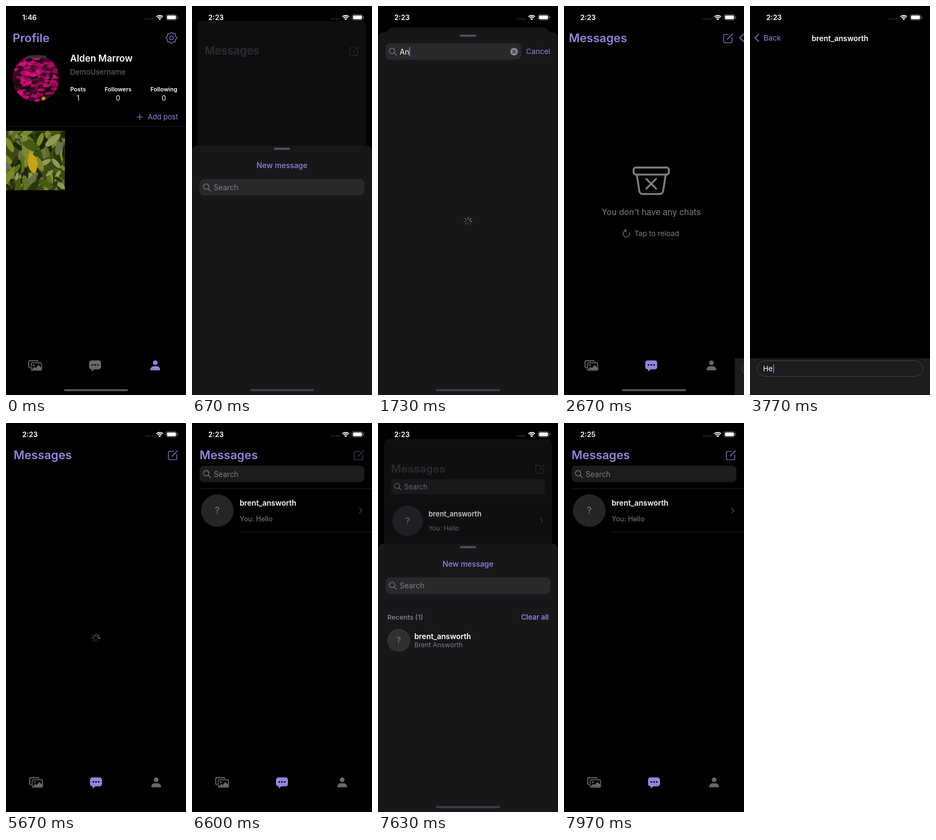
Recreate the animation shown at these times as an HTML page with a canvas. Size 332 px wide and 720 px high, loop 8000 ms.

```html
<!DOCTYPE html>
<html lang="en">
<head>
<meta charset="utf-8">
<title>Messenger demo</title>
<style>
html, body { margin: 0; width: 100%; height: 100%; overflow: hidden; background: #000; }
canvas { display: block; width: 332px; height: 720px; }
</style>
</head>
<body>
<canvas id="stage"></canvas>
<script>
const W = 332, H = 720, LOOP = 8000, STEP = 1000 / 30;
const USER = 'brent_answorth', FULL_NAME = 'Brent Answorth';
const LILAC = '#9286dc', GREY = '#7f7f83', WHITE = '#fff', DIM = '#69696d';
const SHEET = '#17171a', FIELD = '#1c1c1e', SHEET_FIELD = '#29292c', LINE = '#1e1e20';

const canvas = document.getElementById('stage');
const ctx = canvas.getContext('2d');
const dpr = window.devicePixelRatio || 1;
canvas.width = W * dpr;
canvas.height = H * dpr;

const clamp = v => Math.max(0, Math.min(1, v));
const ease = (t, start, dur) => (1 - Math.cos(Math.PI * clamp((t - start) / dur))) / 2;
const mix = (a, b, p) => a + (b - a) * p;

function text(str, x, y, size, color, weight = 400, align = 'left') {
  ctx.font = `${weight} ${size}px Inter, Roboto, sans-serif`;
  ctx.textAlign = align;
  ctx.textBaseline = 'alphabetic';
  ctx.fillStyle = color;
  ctx.fillText(str, x, y + size * 0.364);
}
function textWidth(str, size) {
  ctx.font = `400 ${size}px Inter, Roboto, sans-serif`;
  return ctx.measureText(str).width;
}
function box(x, y, w, h, r, color) {
  ctx.beginPath();
  ctx.roundRect(x, y, w, h, r);
  ctx.fillStyle = color;
  ctx.fill();
}
function disc(x, y, r, color) {
  ctx.beginPath();
  ctx.arc(x, y, r, 0, Math.PI * 2);
  ctx.fillStyle = color;
  ctx.fill();
}
function ring(x, y, r, color, width, from = 0, to = Math.PI * 2) {
  ctx.beginPath();
  ctx.arc(x, y, r, from, to);
  stroke(color, width);
}
function stroke(color, width) {
  ctx.strokeStyle = color;
  ctx.lineWidth = width;
  ctx.lineCap = ctx.lineJoin = 'round';
  ctx.stroke();
}
// Each path is a flat list of x, y pairs.
function lines(color, width, ...paths) {
  ctx.beginPath();
  for (const p of paths)
    for (let i = 0; i < p.length; i += 2) ctx[i ? 'lineTo' : 'moveTo'](p[i], p[i + 1]);
  stroke(color, width);
}
function shifted(x, y, draw) {
  ctx.save();
  ctx.translate(x, y);
  draw();
  ctx.restore();
}
function seeded(seed) {
  return () => (seed = (seed * 16807) % 2147483647) / 2147483647;
}

function statusBar(t) {
  const clock = t < 120 ? '1:46' : t < 7930 ? '2:23' : '2:25';
  text(clock, 30, 21, 13, WHITE, 600);
  for (let i = 0; i < 4; i++) box(257 + i * 4, 23, 2.4, 2, 1, '#48484b');
  const mid = -Math.PI / 2;
  for (const r of [6.2, 9.4]) {
    ctx.beginPath();
    ctx.arc(283.5, 26, r - 0.8, mid - 0.78, mid + 0.78);
    ctx.strokeStyle = WHITE;
    ctx.lineWidth = 2;
    ctx.lineCap = 'butt';
    ctx.stroke();
  }
  ctx.beginPath();
  ctx.moveTo(283.5, 26.3);
  ctx.arc(283.5, 26.3, 3.4, mid - 0.78, mid + 0.78);
  ctx.fillStyle = WHITE;
  ctx.fill();
  ctx.beginPath();
  ctx.roundRect(295.5, 16, 19.5, 10, 3);
  stroke('#707074', 1);
  box(297, 17.5, 16.5, 7, 1.8, WHITE);
  box(316, 19.2, 1.4, 3.6, 1, '#707074');
}

function tabs(active) {
  const color = i => i === active ? LILAC : DIM;
  ctx.beginPath();
  ctx.roundRect(43.8, 656.5, 17, 13, 2.5);
  stroke(color(0), 1.8);
  box(46.5, 658.5, 22.5, 17.5, 4, '#000');
  ctx.beginPath();
  ctx.roundRect(48.3, 660.4, 19, 13.8, 2.5);
  stroke(color(0), 1.6);
  disc(53, 664.6, 1.7, color(0));
  ctx.beginPath();
  ctx.moveTo(49, 673);
  ctx.lineTo(54, 668);
  ctx.lineTo(56.5, 670);
  ctx.lineTo(61.5, 664.5);
  ctx.lineTo(67, 669.5);
  ctx.lineTo(67, 673.6);
  ctx.closePath();
  ctx.fillStyle = color(0);
  ctx.fill();

  box(155, 656, 22, 16.5, 4.5, color(1));
  ctx.beginPath();
  ctx.moveTo(160, 671);
  ctx.lineTo(160, 676.5);
  ctx.lineTo(166.5, 671);
  ctx.fill();
  for (const x of [161, 166, 171]) disc(x, 664.2, 1.5, '#000');

  disc(277, 660.2, 4.3, color(2));
  box(268, 666.8, 18, 7.4, [8, 8, 1.5, 1.5], color(2));
}

function photo(x, y, w, h, round, base, colors, seed, count, rx, ry) {
  const rnd = seeded(seed);
  ctx.save();
  ctx.beginPath();
  ctx.roundRect(x, y, w, h, round);
  ctx.clip();
  ctx.fillStyle = base;
  ctx.fillRect(x, y, w, h);
  for (let i = 0; i < count; i++) {
    const size = 0.6 + rnd() * 0.7;
    ctx.beginPath();
    ctx.ellipse(x + rnd() * w, y + rnd() * h, rx * size, ry * size, (rnd() - 0.5) * (ry > rx ? 2.4 : 0.5), 0, 7);
    ctx.fillStyle = colors[Math.floor(rnd() * colors.length)];
    ctx.fill();
  }
  ctx.restore();
}

function gear(x, y) {
  ctx.beginPath();
  for (let i = 0; i <= 64; i++) {
    const a = i / 64 * Math.PI * 2;
    const r = 8 + 1.9 * clamp(Math.cos(a * 8) * 1.6 + 0.5);
    ctx.lineTo(x + r * Math.cos(a), y + r * Math.sin(a));
  }
  stroke(LILAC, 1.1);
  ring(x, y, 3.4, LILAC, 1.1);
}

function profile(t) {
  shifted(mix(-1.8, 0, ease(t, 0, 110)), 0, () => {
    text('Profile', 14, 59, 21.7, LILAC, 600);
    gear(307, 59);
    photo(14, 91, 86, 86, 43, '#3a0622', ['#b80a68', '#cf0f7c', '#8c0a4c', '#4d0a2c', '#a80b5f', '#1c0a12'], 41, 230, 6, 3);
    box(42, 91.5, 34, 5, 3, '#343434');
    disc(71, 171, 3.5, '#c28a20');
    text('Alden Marrow', 120, 97, 17, WHITE, 600);
    text('DemoUsername', 120, 122, 13.4, DIM);
    const stats = [['Posts', '1', 134.7], ['Followers', '0', 208.5], ['Following', '0', 293]];
    for (const [label, count, x] of stats) {
      text(label, x, 154.5, 10.7, WHITE, 600, 'center');
      text(count, x, 170, 13, WHITE, 400, 'center');
    }
    lines(LILAC, 1.2, [243.5, 205.5, 253.5, 205.5], [248.5, 200.5, 248.5, 210.5]);
    text('Add post', 319, 205.5, 13.1, LILAC, 400, 'right');
    ctx.fillStyle = LINE;
    ctx.fillRect(0, 222.5, W + 2, 1);
    photo(0, 231, 110.5, 110, 0, '#3d4a12', ['#5f7018', '#2a360c', '#7d8a28', '#465a14', '#1c260a', '#8f9a55', '#6b6f4c'], 97, 120, 5, 13);
    ctx.beginPath();
    ctx.moveTo(45, 270);
    ctx.quadraticCurveTo(69, 283, 55, 311);
    ctx.quadraticCurveTo(36, 302, 45, 270);
    ctx.fillStyle = '#c6a21c';
    ctx.fill();
    tabs(2);
  });
}

function compose(color) {
  ctx.beginPath();
  ctx.moveTo(309, 52.5);
  ctx.lineTo(302, 52.5);
  ctx.quadraticCurveTo(299.5, 52.5, 299.5, 55);
  ctx.lineTo(299.5, 65.5);
  ctx.quadraticCurveTo(299.5, 68, 302, 68);
  ctx.lineTo(312.5, 68);
  ctx.quadraticCurveTo(315, 68, 315, 65.5);
  ctx.lineTo(315, 58);
  stroke(color, 1.2);
  lines(color, 1.3, [306.5, 61.5, 316, 51.5]);
}

function searchField(x, y, w, fill, value = '') {
  box(x, y, w, 30.5, 8, fill);
  ring(x + 12, y + 14, 5, GREY, 1.3);
  lines(GREY, 1.3, [x + 15.8, y + 17.8, x + 20, y + 22]);
  text(value || 'Search', x + 26, y + 15.5, 13.8, value ? WHITE : GREY);
}

function spinner(x, y, t) {
  const step = Math.floor(t / 100);
  for (let i = 0; i < 8; i++) {
    const a = i * Math.PI / 4;
    ctx.globalAlpha = 1 - ((step - i + 800) % 8) * 0.11;
    lines('#88888c', 1.6, [x + 3.8 * Math.cos(a), y + 3.8 * Math.sin(a), x + 7.5 * Math.cos(a), y + 7.5 * Math.sin(a)]);
  }
  ctx.globalAlpha = 1;
}

function emptyState(pressed) {
  ctx.beginPath();
  ctx.roundRect(133.5, 299, 65, 13, 4);
  stroke(GREY, 3.6);
  ctx.beginPath();
  ctx.moveTo(139.5, 313);
  ctx.lineTo(144, 342);
  ctx.quadraticCurveTo(145, 348, 150, 348);
  ctx.lineTo(182, 348);
  ctx.quadraticCurveTo(187, 348, 188, 342);
  ctx.lineTo(192.5, 313);
  stroke(GREY, 3.4);
  lines(GREY, 3.2, [157, 320, 175, 338], [175, 320, 157, 338]);
  text("You don't have any chats", 166, 381, 15.4, GREY, 400, 'center');
  ctx.globalAlpha = pressed ? 0.4 : 1;
  ring(120, 421.5, 6, GREY, 1.2, -0.4, 4.5);
  lines(GREY, 1.2, [117, 413.3, 120, 415.5, 117.5, 418]);
  text('Tap to reload', 135, 421, 13.3, GREY);
  ctx.globalAlpha = 1;
}

function avatar(x, y, r, size, fill) {
  disc(x, y, r, fill);
  text('?', x, y, size, GREY, 400, 'center');
}

function chatRow() {
  searchField(14, 79, 304, FIELD);
  ctx.fillStyle = LINE;
  ctx.fillRect(14, 121, W - 14, 1);
  ctx.fillRect(88, 201, W - 88, 1);
  avatar(46.7, 162, 30, 17, '#252528');
  text(USER, 88, 148, 13.8, WHITE, 600);
  text('You: Hello', 88, 177, 12.7, GREY);
  lines('#48484b', 1.3, [309, 157.5, 313.5, 162, 309, 166.5]);
}

function messages(t, p) {
  const fade = clamp(p * 1.4);
  ctx.globalAlpha = 1 - fade * 0.75;
  text('Messages', 14, 59, 21.7, fade > 0.5 ? GREY : LILAC, 600);
  const pressed = (t > 6560 && t < 6720) || (t > 330 && t < 450);
  compose(pressed ? '#4a4668' : fade > 0.5 ? GREY : LILAC);
  ctx.globalAlpha = 1 - p * 0.3;
  if (t < 5400) emptyState(t > 5270);
  else if (t < 5900) spinner(166, 398, t);
  else chatRow();
  ctx.globalAlpha = 1;
  tabs(1);
}

function chat(t, x) {
  shifted(x, 0, () => {
    ctx.fillStyle = '#000';
    ctx.fillRect(0, 0, W, H);
    lines(LILAC, 1.7, [16, 52.5, 9, 59, 16, 65.5]);
    text('Back', 25, 59, 13.7, LILAC);
    text(USER, 166, 59.5, 13.8, WHITE, 600, 'center');
    ctx.fillStyle = FIELD;
    ctx.fillRect(0, 652, W, 68);
    ctx.beginPath();
    ctx.roundRect(13.5, 656.5, 305, 29, 14.5);
    stroke('#444448', 1);
    const typed = t < 4230 ? 'Hello'.slice(0, Math.max(0, Math.floor((t - 3450) / 120))) : '';
    text(typed || 'Message', 24, 671, 13.5, typed ? WHITE : '#5c5c60');
    if (t > 3350 && t < 4550) {
      ctx.fillStyle = LILAC;
      ctx.fillRect(25 + textWidth(typed, 13.5), 663, 1.4, 16);
    }
    if (t >= 4230) {
      ctx.globalAlpha = ease(t, 4230, 150);
      box(264, 612, 54, 30, 13, '#554d8c');
      text('Hello', 291, 627, 13.5, WHITE, 400, 'center');
      ctx.globalAlpha = 1;
    }
  });
}

function sheet(t, p) {
  const first = t < 3000;
  const focus = first ? ease(t, 920, 220) : 0;
  shifted(0, mix(H, 49, p), () => {
    box(0, 0, W, H, [9, 9, 0, 0], SHEET);
    box(151, 4, 30, 4, 2, '#515156');
    ctx.globalAlpha = 1 - focus;
    text('New message', 166, 37, 13.9, LILAC, 500, 'center');
    ctx.globalAlpha = 1;
    const y = mix(62, 20, focus);
    const value = first ? (t > 1560 ? 'An' : t > 1350 ? 'A' : '') : '';
    searchField(14, y, mix(304, 250, focus), SHEET_FIELD, value);
    if (focus > 0) {
      text('Cancel', mix(340, 273, focus), y + 15, 13.7, LILAC);
      ctx.fillStyle = LILAC;
      ctx.fillRect(40 + textWidth(value, 13.8), y + 7, 1.4, 17);
    }
    if (value) {
      disc(251, y + 15.5, 7, '#87878b');
      lines(SHEET_FIELD, 1.3, [248.5, y + 13, 253.5, y + 18], [253.5, y + 13, 248.5, y + 18]);
    }
    if (first && t > 1600 && t < 1930) spinner(166, 349.5, t - 930);
    if (!first) {
      text('Recents (1)', 17, 136, 12.4, GREY, 600);
      text('Clear all', 315, 136, 13, LILAC, 600, 'right');
    }
    if (!first || t >= 1930) shifted(0, first ? -82 : 0, () => {
      avatar(38.3, 178.5, 21.3, 15.5, '#303033');
      text(USER, 67, 171, 13.8, WHITE, 600);
      text(FULL_NAME, 67, 187, 12.2, GREY);
    });
  });
}

function sheetProgress(t) {
  if (t < 3000) return ease(t, 430, 380) - ease(t, 2170, 380);
  return ease(t, 6690, 450) - ease(t, 7497, 400);
}

function draw(time) {
  let t = Math.floor((time + 4) / STEP) * STEP;
  if (t > 7500 && t < 7620) t = 7500;
  ctx.setTransform(dpr, 0, 0, dpr, 0, 0);
  ctx.fillStyle = '#000';
  ctx.fillRect(0, 0, W, H);
  const p = sheetProgress(t);
  if (t < 120) profile(t);
  else {
    const push = ease(t, 2597, 480) - ease(t, 4581, 480);
    const scale = 1 - 0.089 * p;
    ctx.save();
    ctx.translate(W * (1 - scale) / 2 - push * W * 0.3, 40 * p);
    ctx.scale(scale, scale);
    if (p > 0) {
      ctx.beginPath();
      ctx.roundRect(0, 0, W, H, 14 * p);
      ctx.clip();
      ctx.fillStyle = `rgb(${20 * p}, ${20 * p}, ${24 * p})`;
      ctx.fillRect(0, 0, W, H);
    }
    messages(t, p);
    ctx.restore();
    if (push > 0) chat(t, W * (1 - push));
    if (p > 0) sheet(t, p);
  }
  statusBar(t);
  if (t < 2900 || p > 0.1) box(107, 709, 118, 4, 2, p > 0.1 ? '#3c3c42' : '#505058');
}

const began = performance.now();
function tick() {
  draw((performance.now() - began) % LOOP);
  requestAnimationFrame(tick);
}
tick();
</script>
</body>
</html>
```
